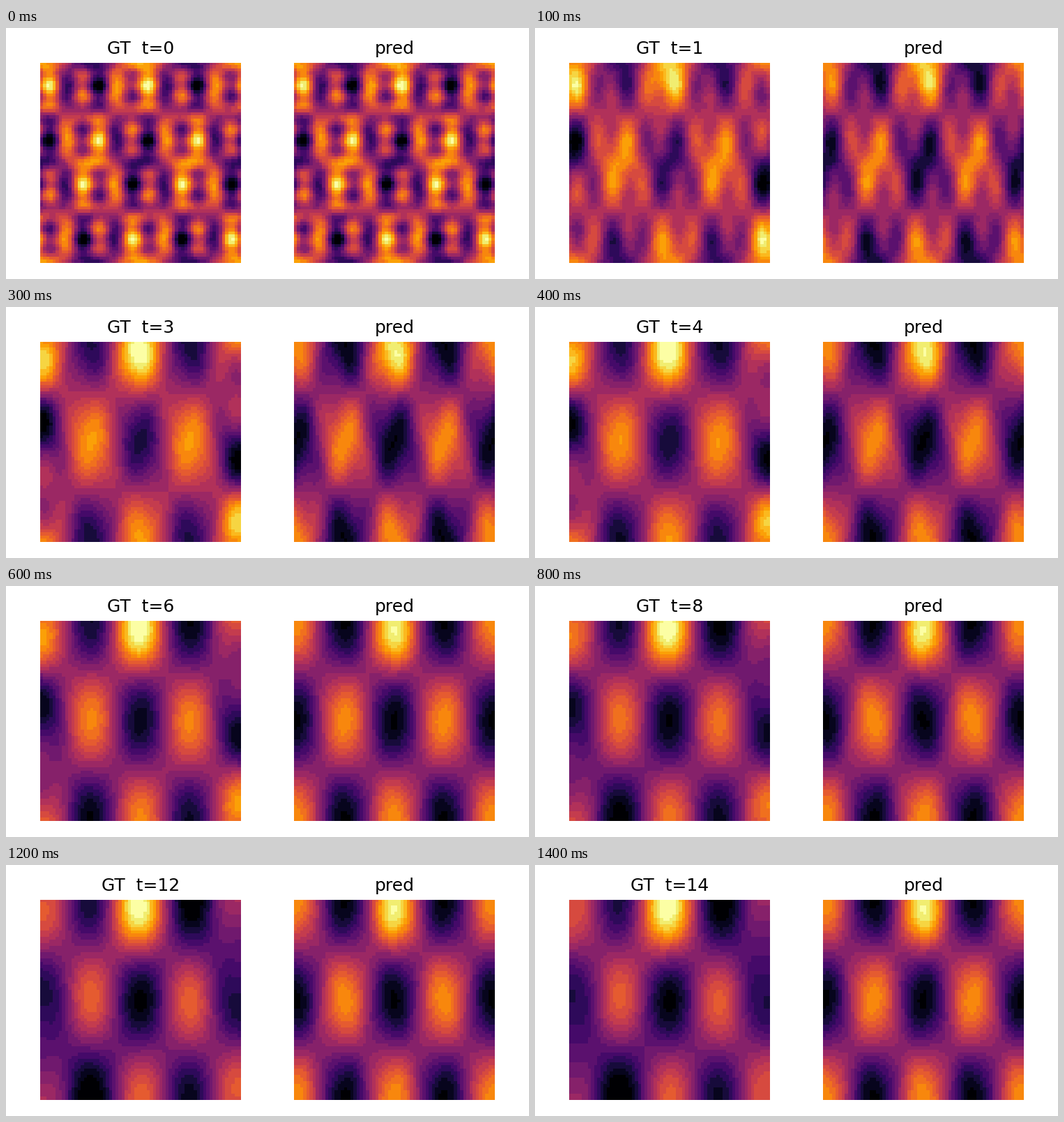
A matplotlib script that plays this animation: 750x360 px, repeating every 1500 ms.

```python
import numpy as np
import matplotlib.pyplot as plt
from matplotlib.animation import FuncAnimation

FRAMES = 15
W, H, SIZE, BOTTOM = 750, 360, 287.5, 22.7
pi, sin, cos, exp = np.pi, np.sin, np.cos, np.exp

axis = np.linspace(0, 1, 64)
x, y = np.meshgrid(axis, axis)


def near(dist, width):
    return exp(-(dist / width) ** 2)


def blob(cx, cy, wx, wy):
    return near(x - cx, wx) * near(y - cy, wy)


# standing waves, from slowest to fastest decay
tilt = cos(pi * x) * cos(pi * y)
slow = cos(4 * pi * x) * cos(2 * pi * y)
fast = sin(12 * pi * x) * sin(4 * pi * y)
ripple = cos(4 * pi * x) * cos(18 * pi * y)

# what the closed left and right walls hold back
walls = near(x, 0.1) + near(1 - x, 0.1)
rim = (near(x, 0.07) - near(1 - x, 0.07)) * sin(4 * pi * y)


def waves(t):
    return 0.28 * exp(-0.8 * t) * fast + 0.1 * exp(-2 * t) * ripple


def truth_field(t):
    swing = 0.35 - 0.15 * exp(-t / 1.5) - 0.0035 * t
    u = 0.32 + 0.15 * near(t, 7) + waves(t)
    u += swing * slow * (1 - 0.03 * t * walls)
    u += 0.36 * exp(-t / 6) * (1 - exp(-1.2 * t)) * rim
    u += 0.006 * t * tilt
    heat = 0.26 - 0.2 * exp(-t) + 0.01 * t
    cy = 0.055 + 0.045 * exp(-t / 3)
    return u + heat * blob(0.485, cy, 0.09 + 0.005 * t, 0.14 + 0.006 * t)


def pred_field(t):
    start = exp(-t)
    u = 0.385 + 0.085 * start + waves(t)
    u += (0.35 - 0.15 * start) * slow
    u += 0.035 * sin(2 * pi * t / 13) * fast
    return u + (0.25 - 0.19 * start) * blob(0.5, 0.08, 0.11, 0.16)


fig = plt.figure(figsize=(5, 2.4), dpi=150, facecolor="white")


def panel(left, title):
    ax = fig.add_axes([left / W, BOTTOM / H, SIZE / W, SIZE / H])
    ax.set_axis_off()
    image = ax.imshow(np.zeros((64, 64)), cmap=plt.get_cmap("inferno", 20),
                      vmin=0, vmax=1, interpolation="nearest", aspect="auto")
    return image, ax.set_title(title, fontsize=12, family="DejaVu Sans")


truth, label = panel(49.25, "GT  t=0")
pred, _ = panel(413.25, "pred")


def update(t):
    truth.set_data(truth_field(t))
    pred.set_data(pred_field(t))
    label.set_text(f"GT  t={t}")
    return truth, pred, label


anim = FuncAnimation(fig, update, frames=FRAMES, interval=100,
                     repeat=True, repeat_delay=0, blit=False)
plt.show()
```
